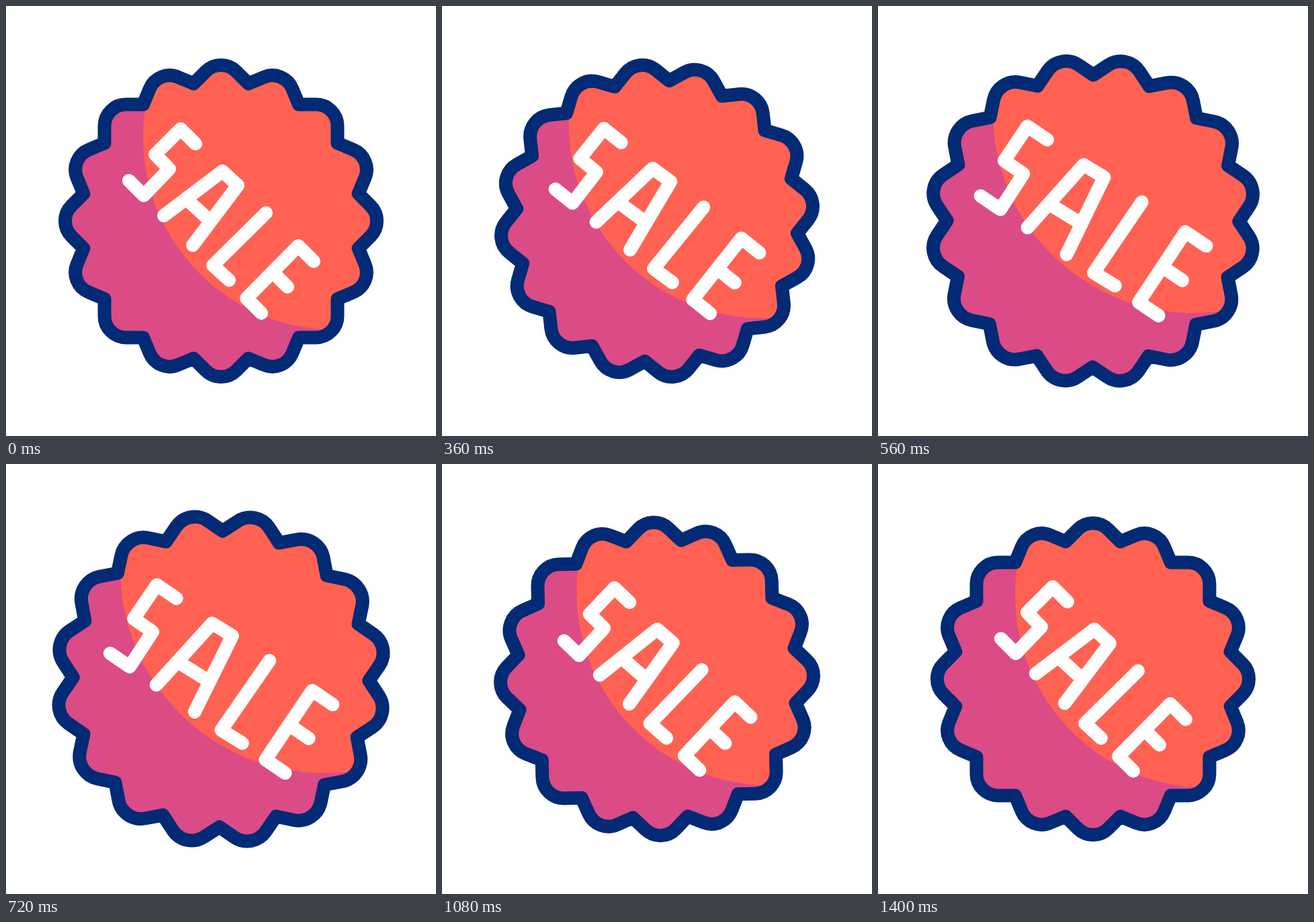
Write an HTML page that moves like this. It is 640x640 px and loops after 1.52 s.

```html
<!DOCTYPE html>
<html lang="en">
<head>
<meta charset="utf-8">
<title>Sale badge</title>
<style>
  html, body { margin: 0; width: 100%; height: 100%; overflow: hidden; background: #fff; }
  svg { display: block; width: 100vw; height: 100vh; }
</style>
</head>
<body>
<svg viewBox="-320 -320 640 640">
  <defs><clipPath id="clip"><path class="edge"/></clipPath></defs>
  <g id="badge" stroke-linejoin="round">
    <path class="edge" fill="#db4b86"/>
    <circle cx="171" cy="-125" r="287" fill="#ff6252" clip-path="url(#clip)"/>
    <path class="edge line" fill="none" stroke="#032a75"/>
  </g>
  <g id="word" fill="none" stroke="#fff" stroke-linecap="round" stroke-linejoin="round">
    <g class="line" transform="translate(-320 -320)">
      <path d="M282 205L260 183L222 221L243 242.500L205 282L183 260"/>
      <path d="M235 312L322 246L345 267L278 356M268 287L304 320"/>
      <path d="M387 308L308 386L332 408"/>
      <path d="M458 380L435 357L358 435L380 457M397 396L419 418"/>
    </g>
  </g>
</svg>
<script>
const LOOP = 1520, STEP = 40, LINE = 20;
const PETALS = 16, REACH = 200, ROUND = 32, NOTCH = 208.6;

function polar(r, deg) {
  const a = deg * Math.PI / 180;
  return [r * Math.cos(a), r * Math.sin(a)];
}

function edgePath() {
  const gap = 360 / PETALS;
  let d = '';
  for (let i = 0; i < PETALS; i++) {
    const dir = i * gap;
    const [cx, cy] = polar(REACH, dir);
    const tangent = side => {
      const [x, y] = polar(ROUND, dir + side * 45);
      return `${(cx + x).toFixed(2)} ${(cy + y).toFixed(2)}`;
    };
    const [nx, ny] = polar(NOTCH, dir - gap / 2);
    d += `${i ? 'L' : 'M'}${nx.toFixed(2)} ${ny.toFixed(2)}L${tangent(-1)}` +
      `A${ROUND} ${ROUND} 0 0 1 ${tangent(1)}`;
  }
  return d + 'Z';
}

// eased progress from 0 to 1 between two times
function ramp(t, from, to) {
  const u = Math.min(1, Math.max(0, (t - from) / (to - from)));
  return u * u * (3 - 2 * u);
}

// swing back, return slightly too far, settle
const spin = t => -11.2 * ramp(t, 90, 590) + 11.7 * ramp(t, 640, 1230) - 0.5 * ramp(t, 1230, 1400);
const badgeSize = t => 1 + 0.056 * (ramp(t, 287, 692) - ramp(t, 760, 1146));
const wordSize = t => 1 + 0.15 * (ramp(t, 175, 600) - ramp(t, 640, 1020));

const badge = document.getElementById('badge');
const word = document.getElementById('word');
const outline = edgePath();
document.querySelectorAll('.edge').forEach(p => p.setAttribute('d', outline));

// the shape grows, its line weight does not
function pose(node, turn, size) {
  node.setAttribute('transform', `rotate(${turn}) scale(${size})`);
  node.querySelector('.line').setAttribute('stroke-width', LINE / size);
}

function draw(ms) {
  const t = Math.floor((ms % LOOP) / STEP) * STEP;
  pose(badge, spin(t), badgeSize(t));
  pose(word, spin(t), wordSize(t));
}

let start;
function tick(now) {
  if (start === undefined) start = now;
  draw(now - start);
  requestAnimationFrame(tick);
}
draw(0);
requestAnimationFrame(tick);
</script>
</body>
</html>
```
